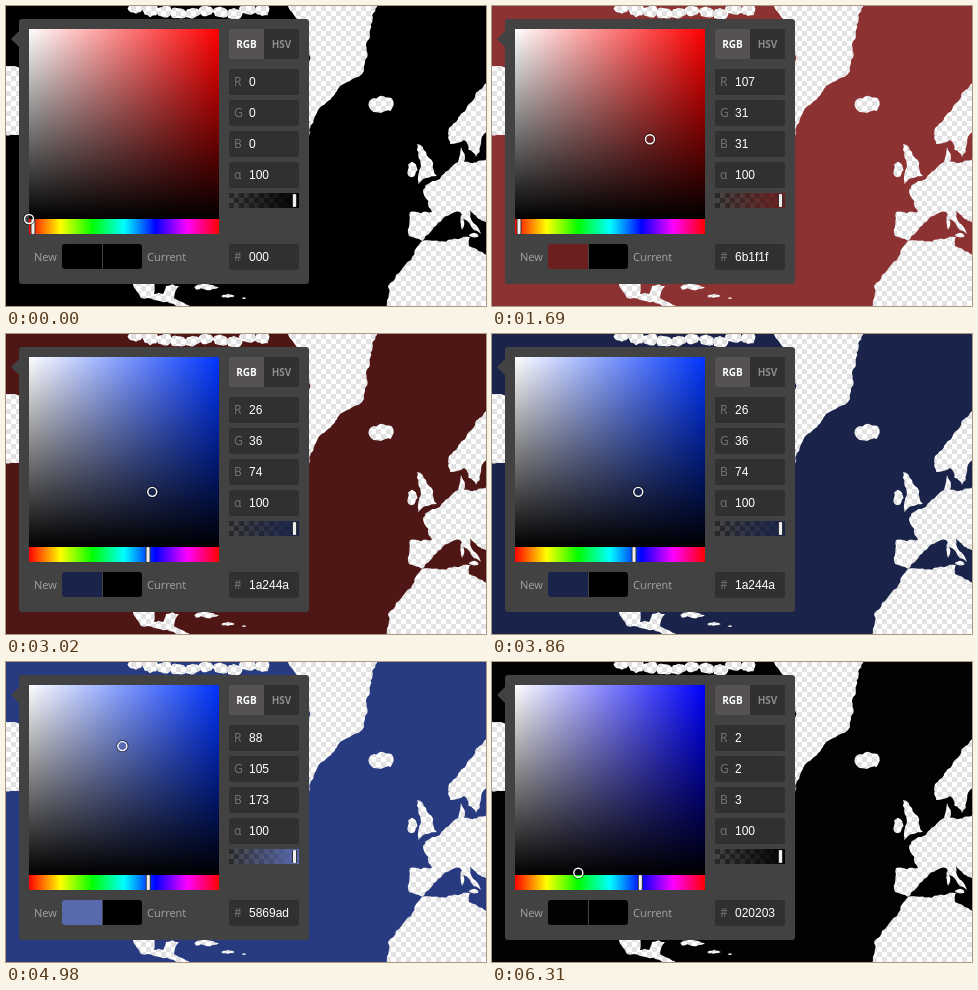
Write an HTML page with a canvas that moves like this. It is 480x300 px and loops after 8 s.

```html
<!DOCTYPE html>
<html lang="en">
<head>
<meta charset="utf-8">
<title>Colour picker over a map</title>
<style>
html, body { margin: 0; width: 100%; height: 100%; overflow: hidden; background: #000; }
canvas { display: block; }
</style>
</head>
<body>
<canvas id="stage" width="480" height="300"></canvas>
<script>
const ctx = document.getElementById('stage').getContext('2d');
const LOOP = 8000, STEP = 70, START = 500, FADE = 420;
const UI = '"Open Sans", sans-serif';
const DIGITS = '"Liberation Sans", Arial, sans-serif';

// Colour helpers
const toRgb = hex => [0, 2, 4].map(i => parseInt(hex.substr(i, 2), 16));
const css = (c, a = 1) => `rgba(${c.map(Math.round).join()},${a})`;

function toHsv([r, g, b]) {
  const max = Math.max(r, g, b), d = max - Math.min(r, g, b);
  let h = 0;
  if (d) h = max === r ? (g - b) / d : max === g ? 2 + (b - r) / d : 4 + (r - g) / d;
  return [(h * 60 + 360) % 360, max ? d / max : 0, max / 255];
}

function fromHsv([h, s, v]) {
  return [5, 3, 1].map(n => {
    const k = (n + h / 60) % 6;
    return Math.round(255 * v * (1 - s * Math.max(0, Math.min(k, 4 - k, 1))));
  });
}

function shortHex(rgb) {
  const hex = rgb.map(n => n.toString(16).padStart(2, '0')).join('');
  return hex.replace(/^(.)\1(.)\2(.)\3$/, '$1$2$3');
}

// Drags of the picker: start, end, colour
const drags = [
  [430, 570, '1f1111'], [710, 1130, '8c3232'], [1550, 1690, '6b1f1f'], [1690, 1970, '4f1616'],
  [2600, 3020, '1a244a'], [3860, 4140, '283a80'], [4420, 4910, '5869ad'],
  [5680, 5750, '010203'], [5750, 5960, '020203']
];
// The map fades to each picked colour later: start, end, colour
const fades = Object.entries({
  1550: '8c3232', 2530: '4f1616', 3440: '1a244a', 4420: '283a80', 5400: '5869ad', 6310: '020203'
}).map(([end, hex]) => [end - FADE, +end, hex]);

// Starts at black and eases through every move that has begun
function follow(moves, t, convert) {
  return moves.reduce((from, [start, end, hex]) => {
    const p = Math.max(0, Math.min(1, (t - start) / (end - start)));
    const to = convert(toRgb(hex)), ease = p * p * (3 - 2 * p);
    return from.map((n, i) => n + (to[i] - n) * ease);
  }, [0, 0, 0]);
}

// Coasts: rough outlines, made jagged by seeded midpoint displacement
let seed = 7;
const rand = () => (seed = seed * 16807 % 2147483647) / 2147483647;
const land = new Path2D();

function coast(x0, y0, x1, y1) {
  const dx = x1 - x0, dy = y1 - y0, len = Math.hypot(dx, dy);
  if (len < 4) return land.lineTo(x1, y1);
  const push = (rand() - 0.5) * Math.min(0.3, 5 / len);
  const mx = x0 + dx / 2 - dy * push, my = y0 + dy / 2 + dx * push;
  coast(x0, y0, mx, my);
  coast(mx, my, x1, y1);
}

function outline(points) {
  land.moveTo(...points[0]);
  points.forEach((p, i) => coast(...p, ...points[(i + 1) % points.length]));
  land.closePath();
}

function island(x, y, rx, ry) {
  outline(Array.from({ length: 8 }, (_, i) => {
    const a = i * Math.PI / 4, r = 0.8 + rand() * 0.4;
    return [x + rx * r * Math.cos(a), y + ry * r * Math.sin(a)];
  }));
}

[
  '278,-9 303,40 303,130 312,104 334,80 358,65 372,-9',
  '411,138 420,146 431,170 412,178 415,160',
  '490,70 444,121 444,138 458,134 470,151 478,128 490,112',
  '490,153 458,156 455,141 452,156 434,173 417,184 426,206 404,206 403,230 416,235 432,217 454,206 475,228 464,204 490,222',
  '415,236 464,231 463,240 490,250 490,310 378,310 382,280',
  '-9,57 20,60 20,126 -9,128',
  '126,274 150,274 148,288 157,288 160,280 173,280 168,292 186,304 135,292'
].forEach(line => outline(line.split(' ').map(p => p.split(',').map(Number))));

island(375, 99, 13, 8);
island(406, 164, 5, 7);
island(456, 216, 2, 7);
island(468, 229, 5, 2);
island(200, 281, 12, 3);
island(222, 290, 7, 2);
island(238, 292, 2, 1);
for (let x = 130; x < 265; x += 14) island(x, 2 + rand() * 6, 8, 6);

function checks(size, a, b, x = 0, y = 0) {
  const tile = document.createElement('canvas');
  tile.width = tile.height = size * 2;
  const c = tile.getContext('2d');
  c.fillStyle = a;
  c.fillRect(0, 0, size * 2, size * 2);
  c.fillStyle = b;
  c.fillRect(0, 0, size, size);
  c.fillRect(size, size, size, size);
  const pattern = ctx.createPattern(tile, 'repeat');
  pattern.setTransform(new DOMMatrix().translate(x, y));
  return pattern;
}
const landFill = checks(5, '#e2e2e2', '#fff');
const alphaFill = checks(5, '#444', '#292929', 223, 187);

// Drawing helpers
function box(x, y, w, h, fill, radius = 0) {
  ctx.fillStyle = fill;
  ctx.beginPath();
  ctx.roundRect(x, y, w, h, radius);
  ctx.fill();
}

function text(str, x, y, color, font, align = 'left') {
  ctx.fillStyle = color;
  ctx.font = font;
  ctx.textAlign = align;
  ctx.fillText(str, x, y);
}

function ramp(x0, y0, x1, y1, colors) {
  const g = ctx.createLinearGradient(x0, y0, x1, y1);
  colors.forEach((c, i) => g.addColorStop(i / (colors.length - 1), c));
  return g;
}

function field(label, value, y) {
  box(223, y, 70, 26, '#303030', 2);
  text(label, 228, y + 17, '#757575', '12px ' + UI);
  text(value, 243, y + 17, '#fff', '12px ' + DIGITS);
}

function handle(x, y, h) {
  box(x - 2.5, y, 5, h, '#333', 1);
  box(x - 1.5, y, 3, h, '#eee', 1);
}

const hues = Array.from({ length: 7 }, (_, i) => `hsl(${i * 60},100%,50%)`);

function drawMap(color) {
  box(0, 0, 480, 300, css(color));
  ctx.fillStyle = landFill;
  ctx.fill(land);
}

function drawPanel(hsv) {
  const [h, s, v] = hsv, rgb = fromHsv(hsv), color = css(rgb);

  box(13, 13, 290, 265, '#424242', 3);
  ctx.beginPath();
  ctx.moveTo(5, 33);
  ctx.lineTo(13, 25);
  ctx.lineTo(13, 41);
  ctx.fill();

  // Saturation and value square, hue bar
  box(23, 23, 190, 190, ramp(23, 0, 213, 0, ['#fff', css(fromHsv([h, 1, 1]))]));
  box(23, 23, 190, 190, ramp(0, 23, 0, 213, ['rgba(0,0,0,0)', '#000']));
  box(23, 213, 190, 15, ramp(23, 0, 213, 0, hues));
  handle(27 + h / 360 * 182, 213, 15);

  // Mode tabs
  box(223, 23, 70, 30, '#303030', 2);
  box(223, 23, 35, 30, '#565254', [2, 0, 0, 2]);
  text('RGB', 240.5, 42, '#fff', 'bold 10px ' + UI, 'center');
  text('HSV', 275.5, 42, '#8a8a8a', 'bold 10px ' + UI, 'center');

  ['R', 'G', 'B'].forEach((name, i) => field(name, rgb[i], 63 + 31 * i));
  field('α', 100, 156);
  field('#', shortHex(rgb), 238);

  // Opacity bar
  box(223, 187, 70, 15, alphaFill);
  box(223, 187, 70, 15, ramp(223, 0, 293, 0, [css(rgb, 0), color]));
  handle(288.5, 188, 13);

  // New and current swatches
  text('New', 28, 255, '#a5a5a5', '11px ' + UI);
  text('Current', 141, 255, '#a5a5a5', '11px ' + UI);
  box(56, 238, 40, 25, color, [3, 0, 0, 3]);
  box(97, 238, 39, 25, '#000', [0, 3, 3, 0]);

  // Ring
  for (const [r, stroke] of [[5.5, 'rgba(0,0,0,.5)'], [4.5, '#fff']]) {
    ctx.beginPath();
    ctx.arc(23 + s * 190, 213 - v * 190, r, 0, Math.PI * 2);
    ctx.lineWidth = 1.4;
    ctx.strokeStyle = stroke;
    ctx.stroke();
  }
}

function frame() {
  const now = performance.now() % LOOP;
  const t = now < START ? 0 : START + Math.floor((now - START) / STEP) * STEP;
  drawMap(follow(fades, t, rgb => rgb));
  drawPanel(follow(drags, t, toHsv));
  requestAnimationFrame(frame);
}
frame();
</script>
</body>
</html>
```
